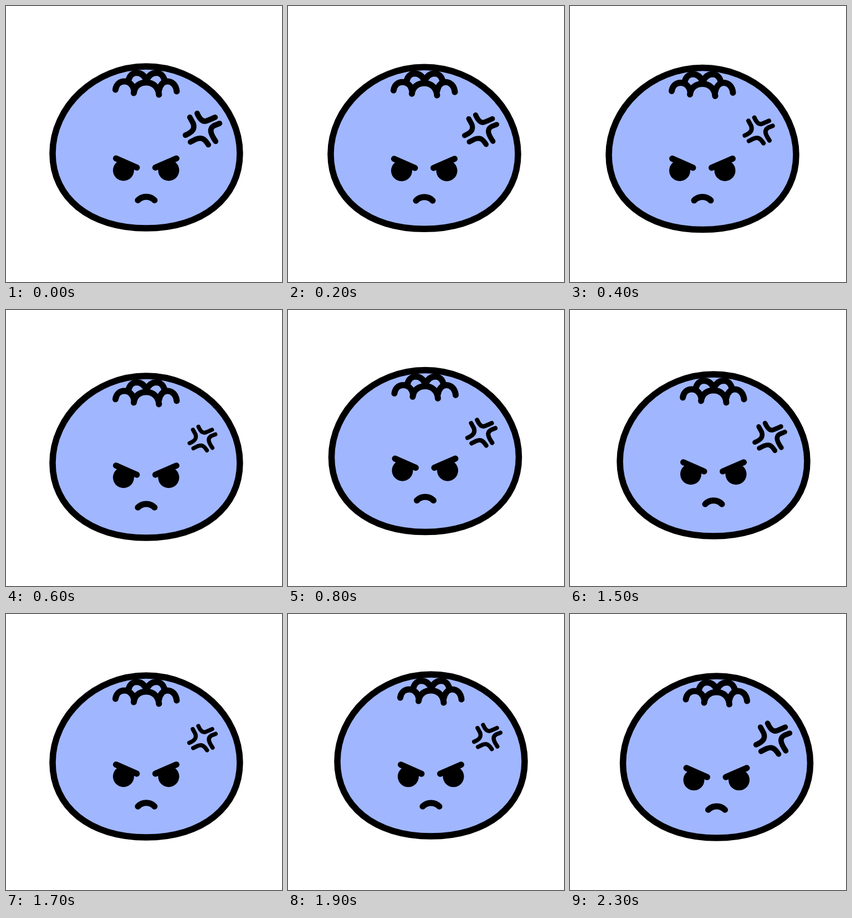
Write an HTML page that moves like this. It is 498x498 px and loops after 2.4 s.

```html
<!DOCTYPE html>
<html lang="en">
<head>
<meta charset="utf-8">
<title>Angry berry</title>
<style>
  html, body { margin: 0; width: 100%; height: 100%; overflow: hidden; background: #fff; }
  svg { display: block; width: 100%; height: 100%; }
  .line { fill: none; stroke: #000; stroke-width: 11; stroke-linecap: round; stroke-linejoin: round; }
  #mark { stroke-width: 9.7; }
  #skin { fill: #a0b6ff; stroke: #000; stroke-width: 11.5; }
</style>
</head>
<body>
<svg viewBox="0 0 498 498">
  <g id="berry">
    <path id="skin" d="M253 109C346 109 422 182 422 266C422 346 355 401 253 401C151 401 84 346 84 266C84 182 160 109 253 109Z"/>
    <g class="line">
      <path d="M221 134C223 125 229 120.500 236 120.500C245 121 250 126 253.500 134C257 126 262 121 271 120.500C278 120.500 284 125 286 134"/>
      <path d="M197.500 151C199 141 206 136 213.500 136C222 136 229 142 231 152"/>
      <path d="M230.500 157C232 144 242 138 253 138C265 138 275 146 276 160"/>
      <path d="M276 152C278 142 284 136 291.500 136C300 136 307 143 308 154"/>
    </g>
    <g id="face">
      <circle cx="212" cy="296.500" r="19"/>
      <circle cx="293.500" cy="296.500" r="19"/>
      <path class="line" d="M198.500 275L236 291.500M307.500 275L269.500 291.500M238 350.500C246 342 260 342 268 350.500"/>
    </g>
    <g id="mark" class="line">
      <path d="M345 194C349 203 354 209 360 208Q364 207 377 201"/>
      <path d="M332 201L338 212C341 221 338 227 324 233"/>
      <path d="M333 245L343 240C353 236 358 239 365 250"/>
      <path d="M385 212L375 216C367 221 367 228 378 244"/>
    </g>
  </g>
</svg>
<script>
const LOOP = 2400, STEP = 100, COUNT = LOOP / STEP;
const MARK = { x: 354.5, y: 222 };

// Shake path: step, x, y
const shake = [
  [0, 0, 0], [4, -14, 2.5], [6, 0, 10], [8, -5.5, -0.5], [10, -8, -1],
  [12, -9.6, 3.5], [15, 6, 7], [17, 0, 2], [18, 2.5, 0], [19, 5, 0],
  [21, 7, -4], [23, 11.5, 3]
];

const berry = document.getElementById("berry");
const face = document.getElementById("face");
const mark = document.getElementById("mark");

const wave = (step, period) => Math.cos(2 * Math.PI * step / period);

function shakeAt(step) {
  const next = shake.findIndex(key => key[0] >= step);
  const b = shake[next], a = shake[Math.max(0, next - 1)];
  const u = a === b ? 0 : (step - a[0]) / (b[0] - a[0]);
  const ease = (1 - Math.cos(Math.PI * u)) / 2;
  return [1, 2].map(i => a[i] + (b[i] - a[i]) * ease);
}

function draw(time) {
  const step = Math.floor((time % LOOP) / STEP) % COUNT;
  const [x, y] = shakeAt(step);
  const lift = -4.25 * (1 - wave(step, 24));
  const size = 0.887 + 0.125 * wave(step, 12);
  berry.setAttribute("transform", `translate(${x} ${y})`);
  face.setAttribute("transform", `translate(0 ${lift})`);
  mark.setAttribute("transform",
    `translate(${MARK.x} ${MARK.y}) scale(${size}) translate(${-MARK.x} ${-MARK.y})`);
}

const start = performance.now();
function tick() {
  draw(performance.now() - start);
  requestAnimationFrame(tick);
}
tick();
</script>
</body>
</html>
```
